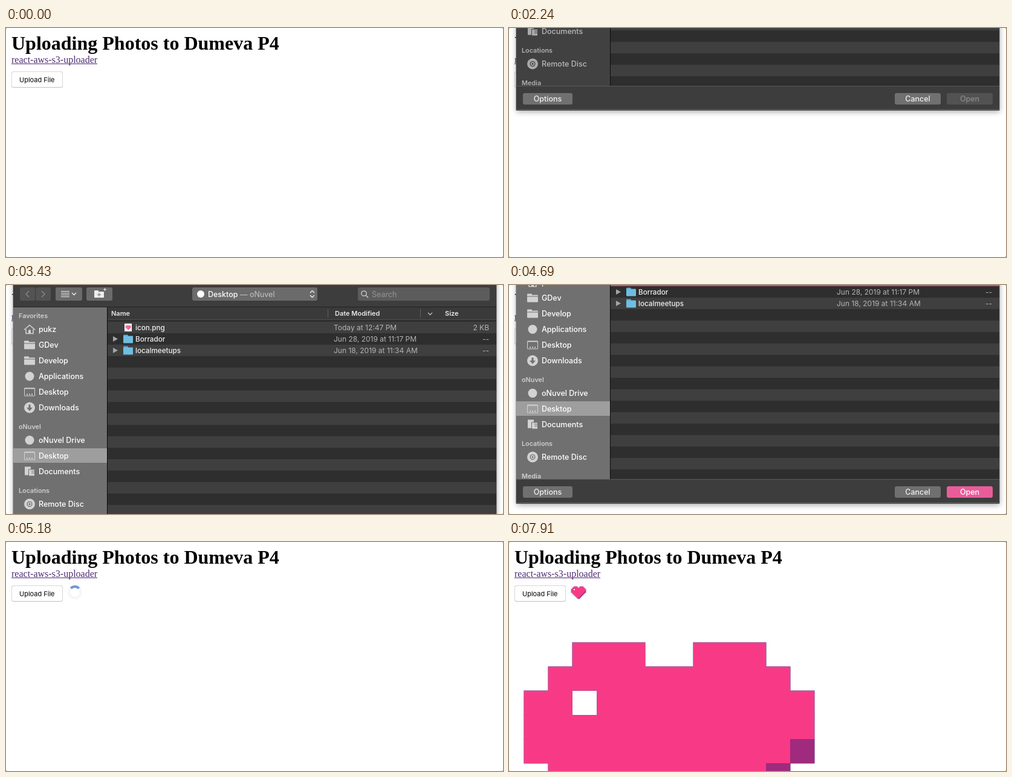
Write an HTML page with a canvas that moves like this. It is 822 px wide and 380 px high and loops after 7.98 s.

```html
<!DOCTYPE html>
<html lang="en">
<head>
<meta charset="utf-8">
<title>Photo upload</title>
<style>
  html, body { margin: 0; width: 100%; height: 100%; overflow: hidden; background: #fff; }
  canvas { display: block; }
</style>
</head>
<body>
<canvas id="stage" width="822" height="380"></canvas>
<script>
const ctx = document.getElementById('stage').getContext('2d');
const LOOP = 7980, STEP = 70;
const SHEET = { x: 11.5, w: 800, h: 442 };
const SLIDE = 406, OPEN_AT = 2087, CLOSE_AT = 4578, CLOSED = 4970;
const LISTED = 2590, ACTIVE = 2660, PICKED = 3500, SPIN_AT = 5150, SPIN_END = 6090, DONE = 6580;
const SANS = 'Inter, "Open Sans", sans-serif', SERIF = '"Liberation Serif", serif';
const LINK = '#4f2d73';

const clamp = v => Math.max(0, Math.min(1, v));
const ease = v => (1 - Math.cos(Math.PI * clamp(v))) / 2;

function rect(x, y, w, h, color) {
  ctx.fillStyle = color;
  ctx.fillRect(x, y, w, h);
}
function round(x, y, w, h, r, color) {
  ctx.beginPath();
  ctx.roundRect(x, y, w, h, r);
  ctx.fillStyle = color;
  ctx.fill();
}
function disc(x, y, r, color) {
  ctx.beginPath();
  ctx.arc(x, y, r, 0, 2 * Math.PI);
  ctx.fillStyle = color;
  ctx.fill();
}
function arc(x, y, r, from, to, color, width) {
  ctx.beginPath();
  ctx.arc(x, y, r, from, to);
  ctx.strokeStyle = color;
  ctx.lineWidth = width;
  ctx.stroke();
}
function line(points, color, width = 1.4) {
  ctx.beginPath();
  points.forEach(([x, y]) => ctx.lineTo(x, y));
  ctx.strokeStyle = color;
  ctx.lineWidth = width;
  ctx.stroke();
}
function poly(points, color) {
  ctx.beginPath();
  points.forEach(([x, y]) => ctx.lineTo(x, y));
  ctx.fillStyle = color;
  ctx.fill();
}
function text(str, x, y, size, color, { weight = 500, align = 'left', family = SANS } = {}) {
  ctx.font = `${weight} ${size}px ${family}`;
  ctx.textAlign = align;
  ctx.fillStyle = color;
  ctx.fillText(str, x, y);
}

// Pixel heart: [row, first column, end column]
const HEART = [[0, 2, 5], [0, 7, 10], [1, 1, 11], [2, 0, 12], [3, 0, 12], [4, 0, 12],
  [5, 1, 11], [6, 2, 10], [7, 3, 9], [8, 4, 8], [9, 5, 7]];

function heart(x, y, unit, edge) {
  const cell = (row, from, to, color, grow = 0) => rect(x + from * unit - grow, y + row * unit - grow,
    (to - from) * unit + 2 * grow, unit + 2 * grow, color);
  if (edge) HEART.forEach(([row, a, b]) => cell(row, a, b, '#7d5a9c', edge));
  HEART.forEach(([row, a, b]) => cell(row, a, b, '#f83a86'));
  HEART.filter(([row]) => row > 3).forEach(([row, , b]) => cell(row, b - 1, b, '#a02a7e'));
  if (edge) cell(2, 2, 3, '#a8508f', edge);
  cell(2, 2, 3, '#fff');
}

function spinner(t) {
  const spun = clamp((t - SPIN_AT) / (SPIN_END - SPIN_AT));
  const angle = 79 * spun ** 2 * Math.PI / 180;
  arc(114, 83.5, 9.5, 0, 2 * Math.PI, '#f6f6f6', 4);
  arc(114, 83.5, 9.5, angle - Math.PI * 0.75, angle - Math.PI * 0.25, '#6f97d8', 4);
}

function page(t) {
  rect(0, 0, 822, 380, '#fff');
  text('Uploading Photos to Dumeva P4', 9, 36, 32, '#000', { weight: 700, family: SERIF });
  text('react-aws-s3-uploader', 9, 58, 16, LINK, { weight: 400, family: SERIF });
  rect(9, 59, 142, 1, LINK);
  round(9, 72, 85, 27, 4, '#c0c0c0');
  round(9, 72, 85, 26, 4, '#d8d8d8');
  round(10, 73, 83, 25, 3, '#fff');
  text('Upload File', 22, 90, 11, '#000', { weight: 400 });
  if (t >= DONE) {
    heart(103, 74, 2, 0.4);
    heart(25, 167, 40, 0.7);
  } else if (t >= CLOSED) spinner(t);
}

const ICONS = {
  home(x, y, c) {
    line([[x - 9, y + 1], [x, y - 7], [x + 9, y + 1]], c, 1.6);
    line([[x - 6, y], [x - 6, y + 7], [x + 6, y + 7], [x + 6, y]], c, 1.6);
    rect(x - 2, y + 1, 4, 6, c);
  },
  folder(x, y, c, back) {
    round(x - 9, y - 7, 8, 5, 1, c);
    round(x - 9, y - 5, 18, 12, 1, c);
    rect(x - 9, y - 3, 18, 1, back);
  },
  dot(x, y, c) { disc(x, y, 7.5, c); },
  desk(x, y, c, back) {
    round(x - 9, y - 7, 18, 14, 1.5, c);
    rect(x - 8, y - 5, 16, 11, back);
    [-5, -1, 3].forEach(dx => rect(x + dx, y + 3, 2, 2, c));
  },
  down(x, y, c, back) {
    disc(x, y, 9, c);
    rect(x - 1.5, y - 5, 3, 6, back);
    poly([[x - 5, y], [x + 5, y], [x, y + 5.5]], back);
  },
  docs(x, y, c, back) {
    rect(x - 8, y - 8, 10, 14, c);
    rect(x - 2, y - 4, 11, 12, back);
    rect(x - 1, y - 3, 9, 10, c);
    [-1, 2].forEach(dy => rect(x + 3, y + dy, 5, 1, back));
  },
  drive(x, y, c, back) {
    disc(x, y, 9, c);
    disc(x, y, 4.5, back);
    disc(x, y, 3.2, c);
    disc(x, y, 1.6, back);
  }
};

const GROUPS = [['Favorites', 51], ['oNuvel', 235], ['Locations', 341], ['Media', 395]];
const PLACES = [
  ['pukz', 73, 'home'], ['GDev', 99, 'folder'], ['Develop', 125, 'folder'],
  ['Applications', 151, 'dot'], ['Desktop', 177, 'desk'], ['Downloads', 203, 'down'],
  ['oNuvel Drive', 257, 'dot'], ['Desktop', 283, 'desk'], ['Documents', 309, 'docs'],
  ['Remote Disc', 363, 'drive']
];
const SELECTED_Y = 283;
const FILES = [
  ['icon.png', 'Today at 12:47 PM', '2 KB'],
  ['Borrador', 'Jun 28, 2019 at 11:17 PM', '--'],
  ['localmeetups', 'Jun 18, 2019 at 11:34 AM', '--']
];

function sidebar(active) {
  const back = active ? '#707070' : '#414141';
  const selected = active ? '#9e9e9e' : '#646464';
  const ink = active ? '#ffffff' : '#b9b9b9';
  const glyph = active ? '#d2d2d2' : '#aaaaaa';
  rect(12, 37, 155, 363, back);
  rect(12, SELECTED_Y - 12, 155, 24, selected);
  rect(167, 37, 1, 363, '#0c0c0c');
  GROUPS.forEach(([name, y]) => text(name, 21, y + 4, 10.8, active ? '#cfcfcf' : '#b0b0b0', { weight: 600 }));
  PLACES.forEach(([name, y, icon]) => {
    ICONS[icon](39, y + 0.5, glyph, y === SELECTED_Y ? selected : back);
    text(name, 54, y + 5, 12.5, ink);
  });
}

function fileList(listed, picked) {
  rect(168, 57, 643, 343, '#2e2e2e');
  for (let y = 61; y < 400; y += 38) rect(168, y, 643, Math.min(19, 400 - y), '#3f3f3f');
  if (picked) rect(168, 61, 643, 19, '#cc4a84');
  rect(168, 37, 643, 20, '#3a3a3a');
  rect(168, 57, 643, 1, '#505050');
  [532, 685].forEach(x => rect(x, 40, 1, 14, '#606060'));
  [['Name', 174], ['Date Modified', 544], ['Size', 726]].forEach(([name, x]) =>
    text(name, x, 51, 11, '#e8e8e8', { weight: 600 }));
  line([[698, 46], [701.5, 49.5], [705, 46]], '#bbb');
  if (!listed) return;
  FILES.forEach(([name, date, size], i) => {
    const y = 70.5 + 19 * i;
    const soft = picked && !i ? '#fff' : '#b4b4b4';
    if (i) {
      poly([[177, y - 4.5], [185, y], [177, y + 4.5]], '#a5a5a5');
      round(194, y - 7, 8, 5, 1, '#5aa9d2');
      round(194, y - 5, 16, 12, 1, '#70bde2');
    } else {
      rect(196, y - 6.5, 12, 13, '#fff');
      heart(197.5, y - 3.8, 0.75, 0);
    }
    text(name, 214, y + 4.5, 11.7, '#f0f0f0');
    text(date, 542, y + 4.5, 12, soft, { weight: 400 });
    text(size, 799, y + 4.5, 12, soft, { weight: 400, align: 'right' });
  });
}

function toolbar() {
  rect(12, 0, 799, 37, '#3d3d3d');
  rect(12, 36, 799, 1, '#222');
  round(23, 4, 25, 22, 3, '#535353');
  round(49, 4, 25, 22, 3, '#535353');
  line([[38, 10], [33, 15], [38, 20]], '#8b8b8b');
  line([[59, 10], [64, 15], [59, 20]], '#8b8b8b');
  [[82, 44], [133, 43], [308, 207]].forEach(([x, w]) => round(x, 4, w, 22, 3, '#6b6b6b'));
  [10, 13, 16, 19].forEach(y => rect(91, y, 14, 1, '#eee'));
  line([[109, 13], [112.5, 16.5], [116, 13]], '#eee');
  round(146, 9, 7, 4, 1, '#eee');
  round(146, 11, 16, 10, 1, '#eee');
  rect(151, 15.5, 6, 1, '#6b6b6b');
  rect(153.5, 13, 1, 6, '#6b6b6b');
  rect(161, 7, 5, 1, '#eee');
  rect(163, 5, 1, 5, '#eee');
  disc(322, 15, 6, '#fff');
  text('Desktop', 334, 20, 12.5, '#fff');
  text('— oNuvel', 387, 20, 12.5, '#c4c4c4', { weight: 400 });
  line([[503, 13], [506.5, 9.5], [510, 13]], '#eee');
  line([[503, 17], [506.5, 20.5], [510, 17]], '#eee');
  round(582, 4, 218, 22, 3, '#5c5c5c');
  arc(592, 14, 4.2, 0, 2 * Math.PI, '#d0d0d0', 1.3);
  line([[595, 17], [599, 21]], '#d0d0d0');
  text('Search', 605, 20, 12.5, '#959595', { weight: 400 });
}

function footer(picked) {
  rect(12, 400, 799, 41, '#3d3d3d');
  rect(12, 400, 799, 1, '#5a5a5a');
  const button = (name, x, w, back, ink) => {
    round(x, 412, w, 19, 3, back);
    text(name, x + w / 2, 426, 12.5, ink, { align: 'center' });
  };
  button('Options', 23, 82, '#707070', '#f0f0f0');
  button('Cancel', 638, 76, '#707070', '#f0f0f0');
  button('Open', 724, 76, picked ? '#e95c9a' : '#525252', picked ? '#fff' : '#8a8a8a');
}

function sheet(t) {
  if (t < OPEN_AT || t >= CLOSED) return;
  const shown = t < CLOSE_AT ? ease((t - OPEN_AT) / SLIDE) : 1 - ease((t - CLOSE_AT) / SLIDE);
  ctx.save();
  ctx.translate(0, Math.round((shown - 1) * SHEET.h));
  ctx.save();
  ctx.shadowColor = 'rgba(0,0,0,.35)';
  ctx.shadowBlur = 9;
  ctx.shadowOffsetY = 4;
  rect(SHEET.x, -20, SHEET.w, SHEET.h + 17, '#6c6c6c');
  ctx.restore();
  toolbar();
  fileList(t >= LISTED, t >= PICKED);
  sidebar(t >= ACTIVE);
  footer(t >= PICKED);
  rect(11, 439, 801, 1, '#6c6c6c');
  ctx.restore();
}

function frame(now) {
  const t = Math.floor(now % LOOP / STEP) * STEP;
  page(t);
  sheet(t);
  [[0, 0], [821, 0], [0, 379], [821, 379]].forEach(([x, y]) => rect(x, y, 1, 1, '#8a8a8a'));
}

const start = performance.now();
function tick() {
  frame(performance.now() - start);
  requestAnimationFrame(tick);
}
tick();
</script>
</body>
</html>
```
